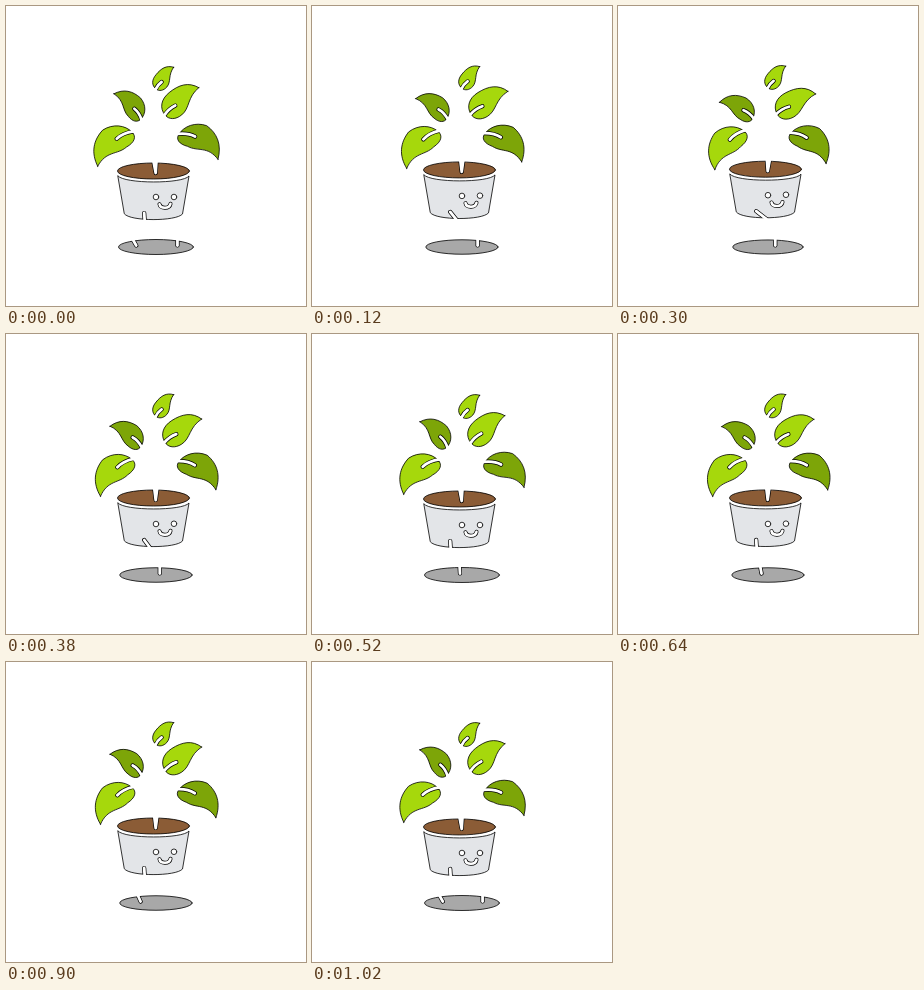
These frames come from a looping animation (300x300 px, 1.04 s). An HTML page with a canvas:

```html
<!DOCTYPE html>
<html lang="en">
<head>
<meta charset="utf-8">
<title>Happy plant</title>
<style>
html, body { margin: 0; width: 100%; height: 100%; overflow: hidden; background: #fff; }
canvas { display: block; }
</style>
</head>
<body>
<canvas id="stage" width="300" height="300"></canvas>
<script>
const ctx = document.getElementById('stage').getContext('2d');
const LOOP = 1040;
const BEAT = LOOP / 2;
const BRIGHT = '#a6d80c', DARK = '#7da508';
const mix = (a, b, p) => a + (b - a) * p;

// x, y: base of the leaf; side: -1 left, 1 right; tilt and droop in degrees below horizontal.
const leaves = [
  { x: 126, y: 126, side: -1, tilt: 45, droop: 9, size: 48.5, curl: 0.12, fill: BRIGHT },
  { x: 173, y: 128, side: 1, tilt: 33, droop: 9, size: 46.5, curl: 0.14, fill: DARK },
  { x: 135, y: 113, side: -1, tilt: -43, droop: 20, size: 37, curl: 0.07, fill: DARK },
  { x: 159, y: 109, side: 1, tilt: -39, droop: 13, size: 43.5, curl: 0, fill: BRIGHT },
  { x: 150, y: 83, side: 1, tilt: -51, droop: 0, size: 28, curl: -0.02, fill: BRIGHT }
];

function oval(x, y, rx, ry) {
  const path = new Path2D();
  path.ellipse(x, y, rx, ry, 0, 0, 2 * Math.PI);
  return path;
}

function stroke(path, color, width) {
  ctx.strokeStyle = color;
  ctx.lineWidth = width;
  ctx.stroke(path);
}

function shape(path, fill) {
  ctx.fillStyle = fill;
  ctx.fill(path);
  stroke(path, '#000', 0.8);
}

// White cut with a thin dark rim that stays inside the shape.
function slot(path, cut) {
  ctx.save();
  ctx.clip(path);
  stroke(cut, '#000', 4.2);
  ctx.restore();
  stroke(cut, '#fff', 2.8);
}

const line = (x0, y0, x1, y1) => new Path2D(`M${x0} ${y0}L${x1} ${y1}`);

function drawLeaf({ x, y, side, tilt, droop, size, curl, fill }, p) {
  const angle = (tilt + droop * p) * Math.PI / 180;
  const cos = Math.cos(angle), sin = Math.sin(angle);
  // Unit leaf: base at 0,0 and tip at 1,0, arched by the curl.
  const at = (u, v) => {
    const w = v + curl * 4 * u * (1 - u);
    return `${x + side * size * (u * cos + w * sin)} ${y - 1.2 * p + size * (u * sin - w * cos)} `;
  };
  const path = new Path2D(
    `M${at(1, 0)}C${at(0.9, 0.26)}${at(0.68, 0.34)}${at(0.4, 0.34)}` +
    `C${at(0.15, 0.34)}${at(0, 0.2)}${at(0, 0)}` +
    `C${at(0, -0.14)}${at(0.12, -0.24)}${at(0.3, -0.24)}` +
    `C${at(0.55, -0.24)}${at(0.65, 0)}${at(1, 0)}Z`);
  shape(path, fill);
  slot(path, new Path2D(`M${at(-0.03, 0)}Q${at(0.15, 0.06)}${at(0.32, 0.02)}`));
}

function drawShadow(t, p) {
  const path = oval(150, 241, mix(37.5, 35, p), mix(7.5, 7, p));
  shape(path, '#a8a8a8');
  const cut = s => {
    const x = 150 - 21.5 * (s + 0.1 * (1 - s * s));
    const lean = Math.max(0, 150 - x) * 0.08;
    slot(path, line(x - lean, 233.5, x + lean, 239.5));
  };
  const s = t / BEAT - 1;
  cut(s);
  if (Math.abs(s) > 0.95) cut(-s);
}

function drawPot(t, p) {
  ctx.save();
  ctx.translate(0, -2 * p);
  const body = new Path2D('M112 170C118 178 177 178 183 170L176.5 208C170 215.5 124 215.5 118.5 208Z');
  shape(body, '#e3e5e8');
  slot(body, line(138.7 + (t < BEAT ? 11 * p : 0), 215, 138.2, 207));

  const soil = oval(147.5, 165, 36, 8);
  const top = mix(149, 150.5, p);
  shape(soil, '#8b5c36');
  slot(soil, new Path2D(`M${top - 1.4} 156L149.7 167L${top + 1.4} 156`));

  for (const eye of [150, 168]) shape(oval(eye, 191 - p * (eye - 150) / 36, 2.8, 2.8), '#fff');
  const smile = new Path2D('M153.5 198.2C154.5 203 163.5 203 164.5 197.8');
  stroke(smile, '#000', 4);
  stroke(smile, '#fff', 2.6);
  ctx.restore();
}

function draw(now) {
  const t = now % LOOP;
  // The lift rises a little faster than it falls.
  const p = Math.sin(Math.PI * (t % BEAT / BEAT) ** 0.92) ** 2;
  ctx.fillStyle = '#fff';
  ctx.fillRect(0, 0, 300, 300);
  ctx.lineCap = ctx.lineJoin = 'round';
  drawShadow(t, p);
  drawPot(t, p);
  for (const leaf of leaves) drawLeaf(leaf, p);
}

const start = performance.now();
function tick() {
  draw(performance.now() - start);
  requestAnimationFrame(tick);
}
tick();
</script>
</body>
</html>
```
